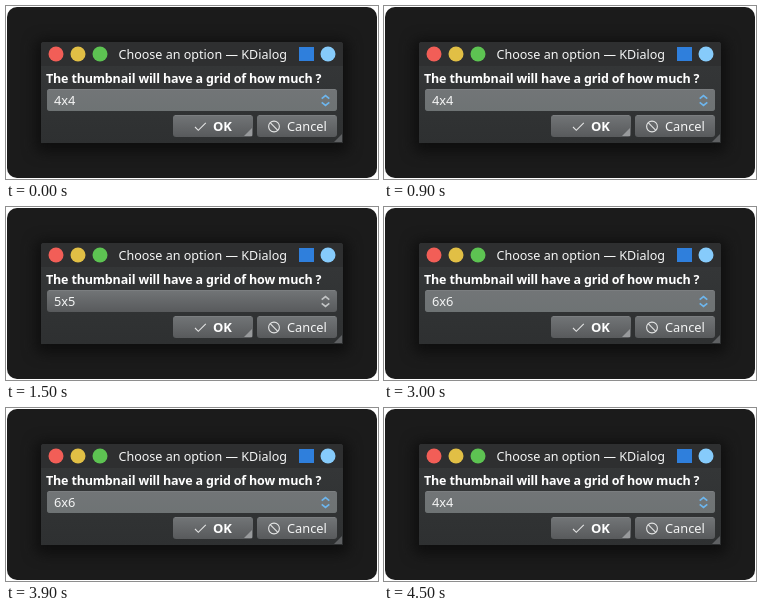
Write an HTML page that moves like this. It is 372 px wide and 173 px high and loops after 6000 ms.

```html
<!DOCTYPE html>
<html lang="en">
<head>
<meta charset="utf-8">
<title>Choose an option</title>
<style>
  html, body { margin: 0; width: 100%; height: 100%; overflow: hidden; background: #fff; }
  svg { display: block; width: 100vw; height: 100vh; }
  text { font: 12.8px "Noto Sans", "Open Sans", sans-serif; fill: #f4f5f5; }
  .title { font-size: 12.55px; }
  .label { font-size: 12.5px; font-weight: 700; letter-spacing: -.17px; fill: #fff; }
  .ok { font-size: 13px; font-weight: 700; fill: #fff; }
  .line { fill: none; stroke: #e4e5e5; stroke-width: 1.1; }
  .shine { stroke: #7b7e80; }
  .arrows { fill: none; stroke: #6db6ee; stroke-width: 1.7; animation: arrows 6s step-end infinite; }
  .hover { animation: hover 6s step-end infinite; }
  .four { animation: four 6s step-end infinite; }
  .five { animation: five 6s step-end infinite; }
  .six { animation: six 6s step-end infinite; }
  @keyframes arrows { 0% { stroke: #6db6ee } 25% { stroke: #c3c5c6 } 50%, 100% { stroke: #6db6ee } }
  @keyframes hover { 0% { opacity: 1 } 25% { opacity: 0 } 50%, 100% { opacity: 1 } }
  @keyframes four { 0% { opacity: 1 } 25% { opacity: 0 } 75%, 100% { opacity: 1 } }
  @keyframes five { 0% { opacity: 0 } 25% { opacity: 1 } 50%, 100% { opacity: 0 } }
  @keyframes six { 0% { opacity: 0 } 50% { opacity: 1 } 75%, 100% { opacity: 0 } }
</style>
</head>
<body>
<svg viewBox="0 0 372 173">
  <defs>
    <linearGradient id="button" x2="0" y2="1">
      <stop stop-color="#727577"/><stop offset="1" stop-color="#585a5c"/>
    </linearGradient>
    <linearGradient id="glow" x2="0" y2="1">
      <stop stop-color="#727577"/><stop offset="1" stop-color="#6e7374"/>
    </linearGradient>
    <linearGradient id="body" x2="0" y2="1">
      <stop stop-color="#363839"/><stop offset="1" stop-color="#2e3031"/>
    </linearGradient>
    <filter id="blur" x="-20%" y="-40%" width="140%" height="180%" color-interpolation-filters="sRGB">
      <feGaussianBlur stdDeviation="7"/>
    </filter>
  </defs>

  <rect x="1" y="1" width="370" height="171" rx="10" fill="#1b1b1b"/>
  <rect x="30" y="34" width="312" height="112" rx="6" fill="#0e0e0e" filter="url(#blur)"/>

  <path d="M35 137V39q0-3 3-3H334q3 0 3 3V137z" fill="url(#body)"/>
  <path d="M35 60V39q0-3 3-3H334q3 0 3 3V60z" fill="#2e2f30"/>
  <path d="M336 128v8h-8z" fill="#5f6163"/>

  <circle cx="50" cy="48" r="7.5" fill="#f25e57"/>
  <circle cx="72" cy="48" r="7.5" fill="#e1bf45"/>
  <circle cx="94" cy="48" r="7.5" fill="#5dc352"/>
  <circle cx="322" cy="48" r="7.5" fill="#86cbfb"/>
  <rect x="293" y="41" width="15" height="14" fill="#2f7fdc"/>
  <text class="title" x="112.5" y="53">Choose an option — KDialog</text>

  <text class="label" x="40" y="76.5">The thumbnail will have a grid of how much ?</text>

  <rect x="41" y="83" width="290" height="22" rx="3" fill="url(#button)"/>
  <rect class="hover" x="41" y="83" width="290" height="22" rx="3" fill="url(#glow)"/>
  <path class="shine" d="M43 83.5H329"/>
  <text class="four" x="48" y="99.3">4x4</text>
  <text class="five" x="48" y="99.3">5x5</text>
  <text class="six" x="48" y="99.3">6x6</text>
  <path class="arrows" d="M315.7 92.7l3.8-3 3.8 3M315.7 96.3l3.8 3 3.8-3"/>

  <rect x="167" y="109" width="80" height="22" rx="3" fill="url(#button)"/>
  <path class="shine" d="M169 109.5H245"/>
  <path d="M246 122v8h-8z" fill="#989a9c"/>
  <path class="line" d="M189 121l3.3 3.3 7.5-7.5"/>
  <text class="ok" x="207" y="125.3">OK</text>

  <rect x="251" y="109" width="80" height="22" rx="3" fill="url(#button)"/>
  <path class="shine" d="M253 109.5H329"/>
  <path class="line" d="M264.2 116.7l7.6 7.6"/>
  <circle class="line" cx="268" cy="120.5" r="5.4"/>
  <text x="281" y="125.3">Cancel</text>
</svg>
</body>
</html>
```
